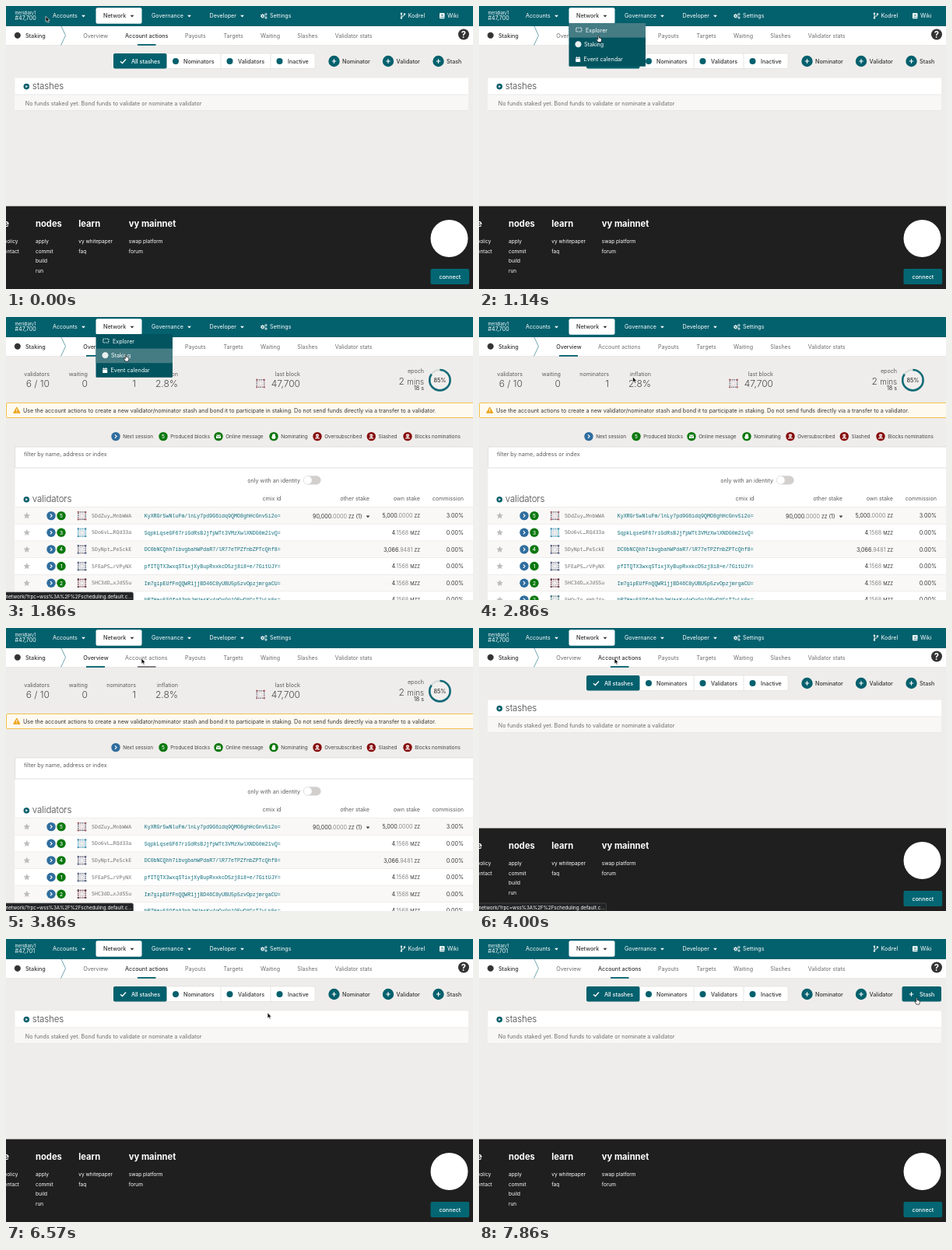
Recreate the animation shown at these times as an HTML page. Size 600 by 364 pixels, loop 8 s.

```html
<!DOCTYPE html>
<html lang="en">
<head>
<meta charset="utf-8">
<title>Staking dashboard</title>
<style>
  html, body { margin: 0; width: 100%; height: 100%; overflow: hidden; background: #efedeb; }
  svg { display: block; width: 100vw; height: 100vh; }
  text { font: 400 7.15px Inter, "Open Sans", sans-serif; fill: #333; white-space: pre; }
  .w { fill: #fff; }
  .m { font-weight: 500; }
  .g { fill: #6c6c6c; }
  .l { fill: #5c5c5c; }
  .big { font-size: 12px; font-weight: 300; fill: #4a4a4a; }
  .mid { font-size: 9.8px; }
  .h { font-size: 11.5px; font-weight: 300; letter-spacing: -.1px; fill: #444; }
  .foot { font-size: 6.5px; fill: #fff; }
  .fh { font-size: 11.2px; font-weight: 700; fill: #fff; }
  .leg { font-size: 6.4px; fill: #444; }
  .chain { font-size: 5.5px; fill: #fff; }
  .id { font: 6.55px "DejaVu Sans Mono", monospace; fill: #747474; }
  .hash { font: 6.63px "Liberation Mono", monospace; fill: #0f6e7c; }
  .url { font-size: 6.25px; fill: #fff; }
  .dec { fill: #8a8a8a; }
  .unit { font-size: 5.9px; }
</style>
</head>
<body>
<svg id="stage" viewBox="0 0 600 364" preserveAspectRatio="none">
  <defs>
    <path id="caret" d="M-2.4 -1.2H2.4L0 1.5Z"/>
    <path id="plus" d="M-2.7 0H2.7M0 -2.7V2.7" stroke="#fff" stroke-width="1.2"/>
    <path id="chev" d="M-1.1 -2.2L1.1 0L-1.1 2.2" fill="none" stroke="#fff" stroke-width="1.1"/>
    <path id="star" d="M0 -4.3L1.3 -1.5L4.2 -1.2L2 .8L2.6 3.8L0 2.3L-2.6 3.8L-2 .8L-4.2 -1.2L-1.3 -1.5Z"/>
    <g id="mail"><rect x="-3" y="-2.2" width="6" height="4.5" rx=".5"/><path d="M-3 -1.4L0 .8L3 -1.4" fill="none" stroke="#0b780e" stroke-width=".7"/></g>
    <path id="palm" d="M-2 3.2L-3 .3L-2 0V-2.4H-1V-3.2H0V-3.3H1V-2.5H2V.8L3 .2L1.7 3.2Z"/>
    <g id="skull"><path d="M-2.2 -1A2.2 2 0 0 1 2.2 -1Q2.1 0 1.2 .4V1.3H-1.2V.4Q-2.1 0 -2.2 -1Z"/><path d="M-2.8 2.9L2.8 1.7M-2.8 1.7L2.8 2.9" stroke="#fff" stroke-width=".7"/><circle cx="-.9" cy="-.8" r=".65" fill="#860c0c"/><circle cx=".9" cy="-.8" r=".65" fill="#860c0c"/></g>
    <path id="calendar" d="M-3 -2.4H-1.9V-3.5H-1V-2.4H1V-3.5H1.9V-2.4H3V-1.2H-3ZM-3 -.7H3V3.3H-3Z"/>
    <g id="blob"><circle r="3.7"/><circle r="3.7" fill="none" stroke="currentColor" stroke-width=".9" stroke-dasharray="1.2 .7"/></g>
    <g id="gear" fill="none" stroke="#fff"><circle r="1.5" stroke-width="1.2"/><circle r="2.4" stroke-width="1" stroke-dasharray=".95 .95"/></g>
  </defs>
</svg>
<script>
const TEAL = '#03606d', DEEP = '#02545f', GREEN = '#0b780e', RED = '#860c0c', BLUE = '#2f6d9e';

const text = (x, y, s, cls = '', anchor = 'start') =>
  `<text x="${x}" y="${y}" class="${cls}" text-anchor="${anchor}">${s}</text>`;
const rect = (x, y, w, h, fill, rx = 0, extra = '') =>
  `<rect x="${x}" y="${y}" width="${w}" height="${h}" rx="${rx}" fill="${fill}" ${extra}/>`;
const dot = (x, y, r, fill) => `<circle cx="${x}" cy="${y}" r="${r}" fill="${fill}"/>`;
const icon = (id, x, y, fill = '#fff') => `<use href="#${id}" x="${x}" y="${y}" fill="${fill}" color="${fill}"/>`;
const path = (d, stroke, width = 1) => `<path d="${d}" fill="none" stroke="${stroke}" stroke-width="${width}"/>`;
const group = (id, body) => `<g id="${id}">${body}</g>`;
const badge = (x, y, fill, mark) => dot(x, y, 5.7, fill) +
  (isNaN(mark) ? icon(mark, x, y) : text(x, y + 2.3, mark, 'foot m', 'middle'));
const tile = (x, y, a, b) => rect(x - 6, y - 6, 12, 12, '#f1eff0') +
  `<g fill="none" stroke-dasharray="1.5 1"><rect x="${x - 4.7}" y="${y - 4.7}" width="9.4" height="9.4" stroke="${a}" stroke-width="1.4"/>` +
  `<rect x="${x - 2.3}" y="${y - 2.3}" width="4.6" height="4.6" stroke="${b}" stroke-width=".8" opacity=".35"/></g>` +
  [-4.8, 4.8].map(i => dot(x + i, y - 4.8, 1.1, b) + dot(x + i, y + 4.8, 1.1, b)).join('');
const bullet = y => dot(26.3, y, 3.8, TEAL) + `<path d="M25.3 ${y - 1.7}L28 ${y}L25.3 ${y + 1.7}Z" fill="#fff"/>`;

function nav() {
  const menus = [[60, 'Accounts', 99.5], [187, 'Governance', 235.5], [261.5, 'Developer', 303.5]];
  return rect(0, 0, 600, 26, TEAL) + text(11.5, 10.7, 'meridian/1', 'chain') +
    `<text id="block" class="w" x="11.5" y="18.4"></text>` +
    menus.map(([x, s, c]) => text(x, 15.3, s, 'w') + icon('caret', c, 12.9)).join('') +
    rect(115.5, 2.3, 59, 20.4, '#fff', 2) + text(125, 15.3, 'Network', 'm') + icon('caret', 162, 12.9, '#333') +
    icon('gear', 329.7, 12.8) + `<use href="#gear" transform="translate(334 10.6) scale(.6)"/>` +
    `<use href="#gear" transform="translate(334 15) scale(.6)"/>` + text(339, 15.3, 'Settings', 'w') +
    group('links', path('M508 10.5V14.8M512 11Q512 13.2 508 13.5', '#fff', .9) +
      dot(508, 9.8, 1.2, '#fff') + dot(508, 15.4, 1.2, '#fff') + dot(512, 10.4, 1.2, '#fff') +
      text(516.5, 15.3, 'Kodrel', 'w') +
      rect(557, 9, 6.5, 7.2, '#fff', 1) + path('M558.8 11H562M558.8 12.4H562M558 14.6H563.5', TEAL, .6) +
      text(567, 15.3, 'Wiki', 'w'));
}

function tabs() {
  const items = [[230, 'Payouts'], [279.5, 'Targets'], [327, 'Waiting'], [374.3, 'Slashes'], [422.8, 'Validator stats']];
  return rect(0, 25, 600, 25.5, '#fff') + rect(0, 50.2, 600, .6, '#e2e0de') +
    icon('blob', 14.8, 37.8, '#333') + text(25, 40.5, 'Staking', 'm') +
    path('M70.5 25L76.5 37.8L70.5 50.5', '#4b8f98', .8) +
    `<text id="tab0" x="99.2" y="40.5">Overview</text><text id="tab1" x="153" y="40.5">Account actions</text>` +
    items.map(([x, s]) => text(x, 40.5, s, 'g')).join('') +
    `<rect id="line0" x="103" y="49" width="24" height="1.8" fill="${TEAL}"/>` +
    `<rect id="line1" x="169" y="49" width="23.5" height="1.8"/>`;
}

function actions() {
  const filters = [[218, 'Nominators', 228], [287.5, 'Validators', 298], [351.5, 'Inactive', 362]];
  const adds = [[421.5, 'Nominator'], [491, 'Validator'], [555.5, 'Stash']];
  const cols = [[38, 'nodes', 'apply commit build run'.split(' ')],
    [93.3, 'learn', ['vy whitepaper', 'faq']], [157.8, 'vy mainnet', ['swap platform', 'forum']]];
  return dot(588, 36.5, 7, '#333') + text(588, 40.6, '?', 'fh', 'middle') +
    rect(138.5, 61, 258.5, 19.5, '#fff', 2, 'stroke="#dcdad8" stroke-width=".6"') +
    rect(138, 61, 68.5, 19.5, TEAL, 2) + path('M147 71.2L149.5 73.5L154 68.5', '#fff', 1.3) +
    text(161, 73.7, 'All stashes', 'w m') + path('M276 61V80.5M340 61V80.5', '#dcdad8', .7) +
    filters.map(([c, s, x]) => dot(c, 71, 4, TEAL) + text(x, 73.7, s, 'm')).join('') +
    adds.map(([c, s]) => dot(c, 71, 7.2, TEAL) + icon('plus', c, 71) + text(c + 10.6, 73.7, s, 'm')).join('') +
    group('hot', rect(543.5, 61, 50.5, 19.5, TEAL, 2) + icon('plus', 555.5, 71) + text(566.1, 73.7, 'Stash', 'w m')) +
    rect(11.5, 92.5, 582.5, 42, '#fff') + rect(11.5, 114, 582.5, 20.5, '#f8f7f6') +
    path('M11.5 114H594M11.5 134.5H594', '#e3e1df', .7) + bullet(103.6) + text(33.8, 107.4, 'stashes', 'h') +
    text(24.8, 127.6, 'No funds staked yet. Bond funds to validate or nominate a validator', 'g') +
    rect(0, 257.5, 600, 107, '#1f1f1f') +
    text(4, 284, 'resource', 'fh', 'end') +
    text(15.5, 304.9, 'privacy policy', 'foot', 'end') + text(17, 317.6, 'contact', 'foot', 'end') +
    cols.map(([x, s, list]) => text(x, 284, s, 'fh') +
      list.map((l, i) => text(x, 304.9 + i * 12.7, l, 'foot')).join('')).join('') +
    dot(569.5, 299, 24, '#fff') +
    rect(545.5, 338, 49.7, 20, '#046673', 2) + text(570.3, 350.7, 'connect', 'w m', 'middle');
}

function overview() {
  const stats = [[56, 'validators', '6 / 10'], [105, 'waiting', '0'], [167, 'nominators', '1'],
    [221, 'inflation', '2.8%'], [378, 'last block', '47,700']];
  const legend = [[141, BLUE, 'chev', 'Next session'], [202, GREEN, 5, 'Produced blocks'],
    [273, GREEN, 'mail', 'Online message'], [344, GREEN, 'palm', 'Nominating'],
    [400, RED, 'skull', 'Oversubscribed'], [469.3, RED, 'skull', 'Slashed'], [516, RED, 'skull', 'Blocks nominations']];
  const heads = [[353.5, 'cmix id'], [467, 'other stake'], [532, 'own stake'], [588, 'commission']];
  const rows = [
    [5, '5DdZuy…MnbWWA', 'KyXRGr5wNluFm/lnLy7pd9G6idq9QMO8ghHcGnv5i2o=', '5,000.0000 ZZ', '#66606c', '#b0585c'],
    [3, '5Do6vL…RQd33a', 'SqpkLqseGF67riGdRsBJjfpWTt3VMzXwlXNDG0m21vQ=', '4.1568 MZZ', '#56b1cc', '#3f86a8'],
    [4, '5DyNpt…PeSckE', 'DC0bNCQhh7ibvgbahWPdaR7/lR77eTPZfnbZPTcQhf8=', '3,066.9481 ZZ', '#6b6472', '#4a5a8c'],
    [1, '5FEaPS…rVPyNX', 'pfITQTX3wxqSTixjXyBupRxxkcD5zj8i8+e/7GitUJY=', '4.1568 MZZ', '#5f6f80', '#3c4f7a'],
    [2, '5HC3dD…xJdSSu', 'Im7gipEUfFnQQWR1jjBD46C8yUBU5p5zvOpzjmrgaCU=', '4.1568 MZZ', '#7d3a46', '#4c2c34'],
    [2, '5HQvTe…mWkZ4p', 'bRZHeu5SOfgA3nhJmUasKv4gQxGp19EwDXCcT7yLk0s=', '4.1568 MZZ', '#4f8d86', '#37647e']];
  const coin = s => {
    const [whole, decimals, unit] = s.split(/[. ]/);
    return `${whole}.<tspan class="dec">${decimals}</tspan> <tspan class="unit">${unit}</tspan>`;
  };
  return stats.map(([x, s, v]) => text(x, 75.5, s, 'l', 'end') + text(x, 90.1, v, 'big', 'end')).join('') +
    tile(327, 85.5, '#77707c', '#b0585c') +
    text(537, 71.8, 'epoch', 'l', 'end') +
    text(537, 86.5, '2 <tspan class="mid">mins</tspan>', 'big', 'end') + text(537, 94.3, '18 s', '', 'end') +
    `<circle cx="557.4" cy="81.2" r="13.2" fill="#f1efed" stroke="#d5dcdc" stroke-width="2.6"/>` +
    `<circle cx="557.4" cy="81.2" r="13.2" fill="none" stroke="#146b78" stroke-width="2.6" pathLength="100" stroke-dasharray="85 15" transform="rotate(-90 557.4 81.2)"/>` +
    text(557.5, 83.9, '85%', 'm', 'middle') +
    rect(.5, 110.5, 602, 19, '#fffaf0', 1.5, 'stroke="#f2c14a" stroke-width="1"') +
    '<path d="M13.8 116L18 123.4H9.6Z" fill="#eda51f" stroke="#eda51f" stroke-linejoin="round"/>' + path('M13.8 118V120.8M13.8 121.6V122.7', '#fff', 1) +
    text(22, 122.7, 'Use the account actions to create a new validator/nominator stash and bond it to participate in staking. Do not send funds directly via a transfer to a validator.') +
    legend.map(([x, c, i, s]) => badge(x, 153.6, c, i) + text(x + 9.2, 155.9, s, 'leg')).join('') +
    rect(11.5, 167, 589, 197, '#fff') +
    rect(11.8, 167, 600, 27, 'none', 0, 'stroke="#d9d7d5" stroke-width=".8"') +
    text(23, 178.6, 'filter by name, address or index', 'l') +
    text(378, 212.5, 'only with an identity', 'l', 'end') +
    rect(382, 204.3, 22.6, 11.2, '#d2d0ce', 5.6) + dot(387.7, 209.9, 5.1, '#fff') +
    bullet(234.8) + text(33.8, 238.4, 'validators', 'h') +
    heads.map(([x, s]) => text(x, 236, s, 'l', 'end')).join('') +
    rows.map(([n, id, hash, own, a, b], i) => {
      const y = 255.6 + i * 21.65;
      return rect(11.5, y - 11, 589, 21.65, i % 2 ? '#fff' : '#f9f8f7') + rect(11.5, y - 11.3, 589, .6, '#e5e3e1') +
        icon('star', 26.7, y, '#bdbdbd') + badge(58, y, BLUE, 'chev') + badge(71, y, GREEN, n) + tile(97.5, y, a, b) +
        text(110, y + 2.2, id, 'id') + text(177.7, y + 2.4, hash, 'hash') +
        (i ? '' : text(457.5, y + 3.4, coin('90,000.0000 ZZ') + ' (1)', '', 'end') + icon('caret', 465, y + 1.2, '#333')) +
        text(532, y + 2.6, coin(own), '', 'end') + text(588, y + 2.6, i ? '0.00%' : '3.00%', '', 'end');
    }).join('');
}

function menu() {
  return rect(115.5, 22, 98.5, 55.8, DEEP, 1) +
    `<rect id="pick" x="115.5" width="98.5" height="18.6" fill="#457c84"/>` +
    '<rect x="124.8" y="28" width="7" height="5" fill="none" stroke="#fff" stroke-width="1.1" stroke-dasharray="1.4 1"/>' +
    text(137, 33.5, 'Explorer', 'w') + icon('blob', 127.5, 49.2, '#e9f0f0') + text(135, 52.2, 'Staking', 'w') +
    icon('calendar', 127.2, 68.6) + text(134.5, 71.3, 'Event calendar', 'w');
}

const stage = document.getElementById('stage');
stage.innerHTML += rect(0, 0, 600, 364, '#efedeb') + tabs() + group('actions', actions()) +
  group('overview', overview()) + nav() + group('menu', menu()) +
  group('status', `<path id="plate" fill="#222426" stroke="#55585a" stroke-width=".6"/>` +
    `<text id="url" class="url" x="-.5" y="361.7"></text>`) +
  group('cursor', '<path id="arrow" d="M0 0V7.2L1.7 5.7L2.8 8.2L4.1 7.6L3 5.2H5.2Z" fill="#111" stroke="#fff" stroke-width=".6"/>' +
    '<path id="hand" d="M-1.2 -3.6Q-.5 -4.6 .2 -3.6V-.9Q1 -1.4 1.4 -.6Q2.1 -1 2.4 -.2Q3.2 -.4 3.3 .5V2.2Q3 3.4 2.5 4.6H-1L-3.2 1.2Q-3 .2 -2 .7L-1.2 1.4Z" fill="#fff" stroke="#111" stroke-width=".7"/>');

const $ = id => document.getElementById(id);
const show = (id, on) => { $(id).style.display = on ? '' : 'none'; };

// step, x, y
const track = [[0, 51, 13.2], [4, 112, 13], [6, 152, 20], [8, 154, 42], [13, 154.5, 52.5], [15, 155, 53],
  [18, 190, 82], [22, 205, 72], [25, 178, 43], [27, 174, 39], [29, 174, 39], [30, 175, 44], [32, 180, 58],
  [36, 190, 75], [38, 190.5, 75.5], [42, 225, 90], [43, 225, 90], [48, 410, 98], [51, 552, 92], [53, 562, 80], [55, 563, 79.5]];

function pointAt(n) {
  const i = Math.max(1, track.findIndex(p => p[0] >= n));
  const [a, b] = [track[i - 1], track[i]];
  const k = (n - a[0]) / (b[0] - a[0]);
  return [a[1] + (b[1] - a[1]) * k, a[2] + (b[2] - a[2]) * k];
}

const STEPS = 56, RATE = 7 / 1000;
const between = (n, a, b) => n >= a && n < b;

function draw(n) {
  const [x, y] = pointAt(n);
  const onOverview = between(n, 13, 28);
  const hovered = between(n, 25, 28);
  const hand = between(n, 5, 18) || between(n, 33, 40) || n >= 52;
  const wide = n >= 30;
  const w = wide ? (n < 32 ? 220 : 228) : 163.5;

  $('block').textContent = n < 32 ? '#47,700' : '#47,701';
  show('overview', onOverview);
  show('actions', !onOverview);
  show('links', !onOverview);
  show('hot', n >= 52);
  show('line0', onOverview);
  show('line1', !onOverview || hovered);
  $('line1').setAttribute('fill', onOverview ? '#777' : TEAL);
  $('tab0').setAttribute('class', onOverview ? 'm' : 'g');
  $('tab1').setAttribute('class', onOverview ? 'g' : 'm');

  show('menu', between(n, 5, 18));
  show('pick', n >= 6);
  $('pick').setAttribute('y', n < 9 ? 22 : 40.6);

  show('status', between(n, 9, 18) || between(n, 25, 39));
  $('plate').setAttribute('d', `M-1 365V354H${w - 2}Q${w} 354 ${w} 356V365Z`);
  $('url').textContent = 'network/?rpc=wss%3A%2F%2Fscheduling.default.c' + (wide ? 'mix.rip#/staking/actions' : '...');

  $('cursor').setAttribute('transform', `translate(${x} ${y})`);
  show('hand', hand);
  show('arrow', !hand);
}

let last = -1;
function tick() {
  const n = Math.floor((performance.now() % 8000 + 5) * RATE) % STEPS;
  if (n !== last) draw(last = n);
  requestAnimationFrame(tick);
}
tick();
</script>
</body>
</html>
```
